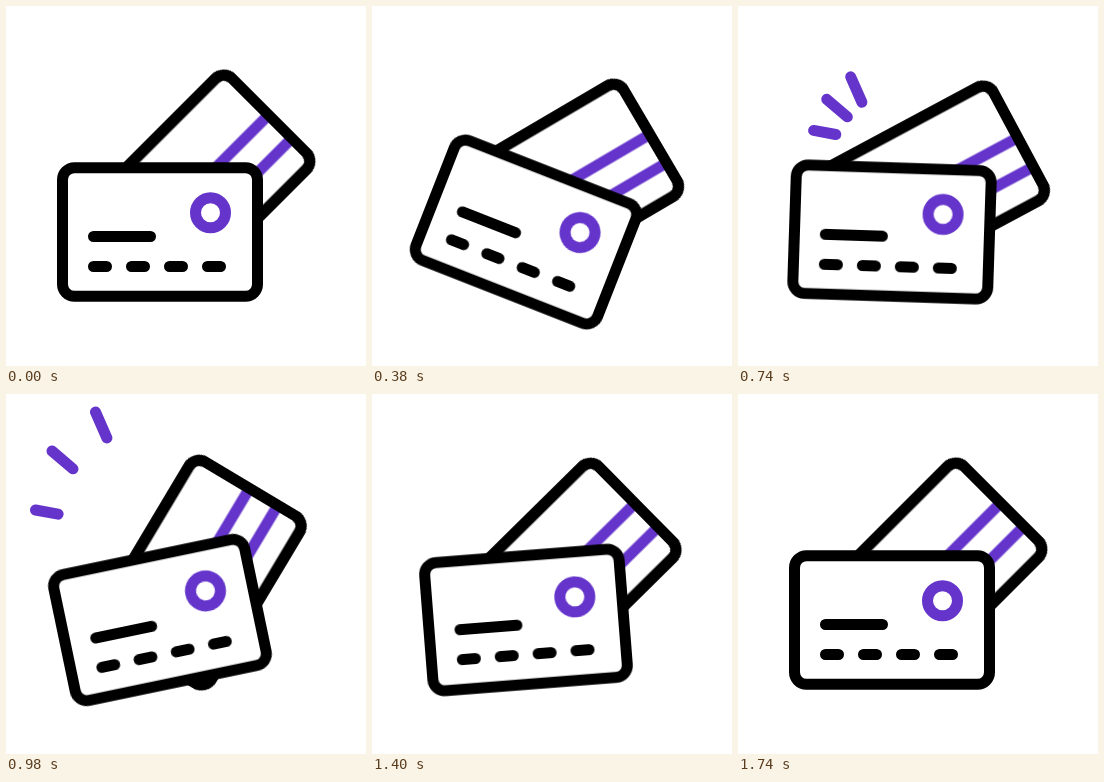
Recreate the animation shown at these times as an HTML page. Size 360 by 360 pixels, loop 2400 ms.

```html
<!DOCTYPE html>
<html lang="en">
<head>
<meta charset="utf-8">
<title>Bank cards</title>
<style>
  html, body { margin: 0; width: 100%; height: 100%; overflow: hidden; background: #fff; }
  svg { display: block; width: 100%; height: 100%; }

  .card { fill: #fff; stroke: #000; }
  .accent { stroke: #6535cb; }
  .ink { stroke: #000; }
  .round { stroke-linecap: round; }

  /* Damped swing around the card centre; the back card follows a little later. */
  .swing {
    transform-origin: 0 0;
    animation: swing 2400ms cubic-bezier(.3333, 0, .6667, 1) infinite;
  }
  .late { animation-delay: 100ms; }
  @keyframes swing {
    0% { transform: rotate(0deg); }
    21.667% { transform: rotate(26deg); }
    38.125% { transform: rotate(-15deg); }
    49.583% { transform: rotate(7.2deg); }
    57.917% { transform: rotate(-4.5deg); }
    68.333%, 100% { transform: rotate(0deg); }
  }

  /* A short dash runs outwards along each ray. */
  .ray {
    opacity: 0;
    stroke-dasharray: 0 2;
    animation: shoot 2400ms linear infinite;
  }
  @keyframes shoot {
    0%, 26.042% { opacity: 0; stroke-dasharray: 0 2; stroke-dashoffset: 0; }
    26.05% { opacity: 1; }
    30.833% { stroke-dasharray: .324 2; stroke-dashoffset: 0; }
    40.833% { stroke-dasharray: .333 2; stroke-dashoffset: -.667; }
    45.83% { opacity: 1; }
    45.833%, 100% { opacity: 0; stroke-dasharray: 0 2; stroke-dashoffset: -1; }
  }
</style>
</head>
<body>
<svg viewBox="0 0 360 360" fill="none" stroke-width="11">
  <defs>
    <rect id="outline" x="-97.5" y="-64.3" width="195" height="128.6" rx="12"/>
  </defs>

  <g class="accent round">
    <path class="ray" pathLength="1" d="M98 128.5L29.5 116"/>
    <path class="ray" pathLength="1" d="M109.5 111L46 57"/>
    <path class="ray" pathLength="1" d="M124 96.5L89.5 18"/>
  </g>

  <g transform="translate(194.3 178.6) rotate(-45)">
    <g class="swing late">
      <use href="#outline" class="card" stroke="none"/>
      <path class="accent" d="M-92 -1H92M-92 32H92"/>
      <use href="#outline" class="ink"/>
    </g>
  </g>

  <g transform="translate(154 226)">
    <g class="swing">
      <use href="#outline" class="card"/>
      <circle class="accent" cx="50.5" cy="-19.3" r="15"/>
      <path class="ink round" d="M-66.5 4.5H-9.5M-66.5 34.5h13m25 0h13m25 0h13m25 0h13"/>
    </g>
  </g>
</svg>
</body>
</html>
```
